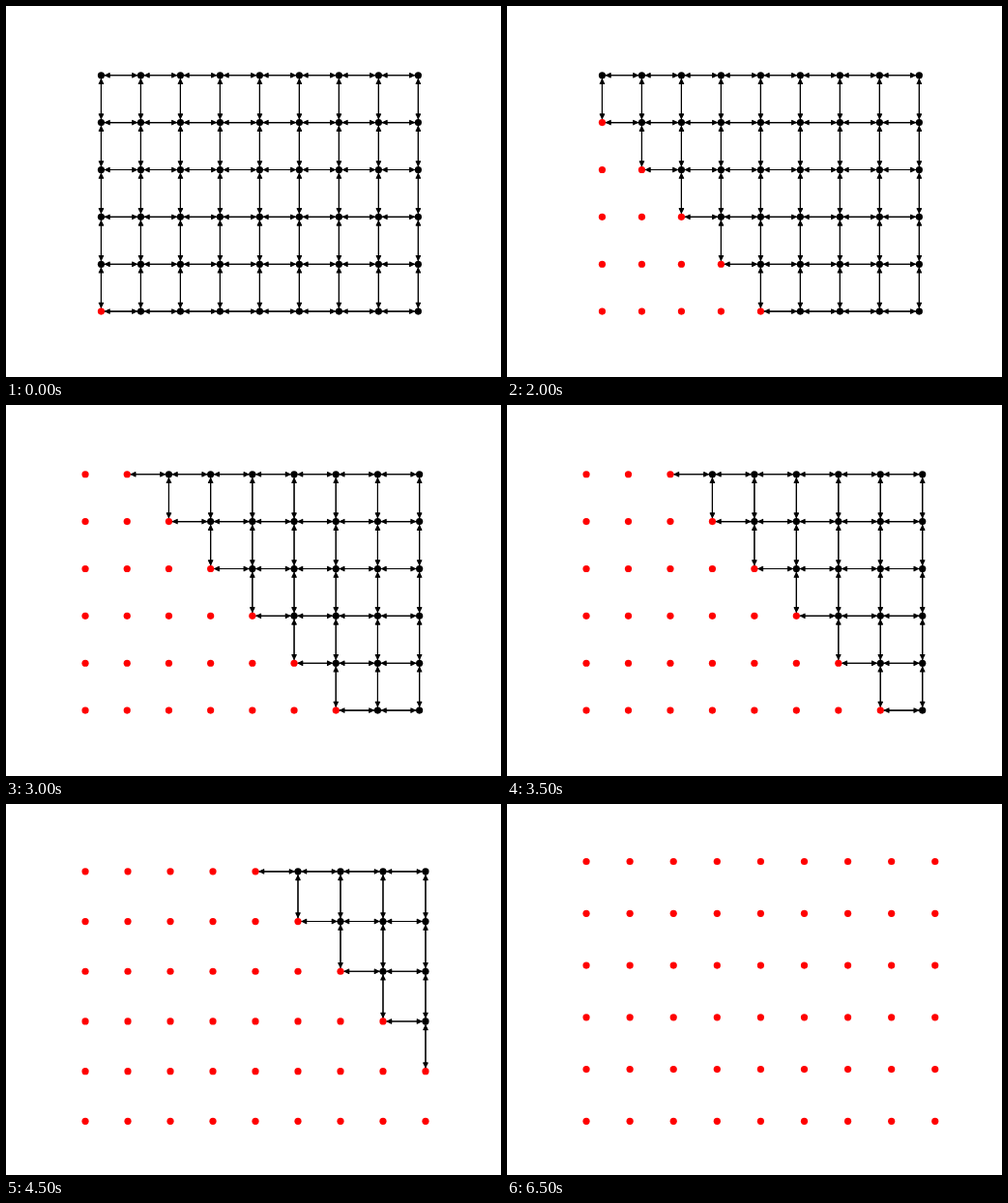
Recreate the animation shown at these times as an HTML page with a canvas. Size 512 px wide and 384 px high, loop 7000 ms.

```html
<!DOCTYPE html>
<html>
<head>
<meta charset="utf-8">
<title>Grid spread</title>
<style>
  html, body { margin: 0; width: 100%; height: 100%; overflow: hidden; background: #fff; }
  canvas { display: block; }
</style>
</head>
<body>
<canvas id="stage" width="512" height="384"></canvas>
<script>
const ctx = document.getElementById('stage').getContext('2d');
const COLS = 8, ROWS = 5;          // last column and row index
const STEP = 500, STEPS = COLS + ROWS + 1;
const PT = 80 / 72;                // one point in pixels
const RADIUS = 3.6;
const GAP = Math.sqrt(30) / 2 * PT;
const TIP = GAP + 0.5 * Math.sqrt(5) * PT;
const HEAD = 4 * PT, HALF = 2 * PT;

// Maps grid indices to pixels; the view fits all nodes plus the padded edge area.
function axis(last, firstEdge, start, length) {
  const pad = 0.05 * (last - firstEdge);
  const low = Math.min(0, firstEdge - pad);
  const unit = length / (last + pad - low);
  return n => start + (n - low) * unit;
}

function arrow(x1, y1, x2, y2) {
  const len = Math.hypot(x2 - x1, y2 - y1);
  ctx.save();
  ctx.translate(x1, y1);
  ctx.transform((x2 - x1) / len, (y2 - y1) / len, (y1 - y2) / len, (x2 - x1) / len, 0, 0);
  ctx.beginPath();
  ctx.moveTo(GAP, 0);
  ctx.lineTo(len - TIP, 0);
  ctx.stroke();
  ctx.beginPath();
  ctx.moveTo(len - TIP - HEAD, HALF);
  ctx.lineTo(len - TIP, 0);
  ctx.lineTo(len - TIP - HEAD, -HALF);
  ctx.closePath();
  ctx.fill();
  ctx.stroke();
  ctx.restore();
}

function draw(step) {
  const px = axis(COLS, Math.max(0, step - ROWS), 82.036, 360.727);
  const py = axis(ROWS, Math.max(0, step - COLS), 328.32, -268.8);
  const link = (i, j, m, n) => {
    if (m > COLS || n > ROWS || m + n <= step) return;
    arrow(px(i), py(j), px(m), py(n));
    arrow(px(m), py(n), px(i), py(j));
  };
  const each = fn => {
    for (let i = 0; i <= COLS; i++) for (let j = 0; j <= ROWS; j++) fn(i, j);
  };

  ctx.fillStyle = '#fff';
  ctx.fillRect(0, 0, 512, 384);
  ctx.fillStyle = ctx.strokeStyle = '#000';
  ctx.lineWidth = PT;
  ctx.lineCap = ctx.lineJoin = 'round';
  each((i, j) => {
    link(i, j, i + 1, j);
    link(i, j, i, j + 1);
  });
  each((i, j) => {
    ctx.fillStyle = i + j <= step ? '#f00' : '#000';
    ctx.beginPath();
    ctx.arc(px(i), py(j), RADIUS, 0, 2 * Math.PI);
    ctx.fill();
  });
}

let shown = -1;
function tick() {
  const step = Math.floor(performance.now() / STEP) % STEPS;
  if (step !== shown) draw(shown = step);
  requestAnimationFrame(tick);
}
tick();
</script>
</body>
</html>
```
